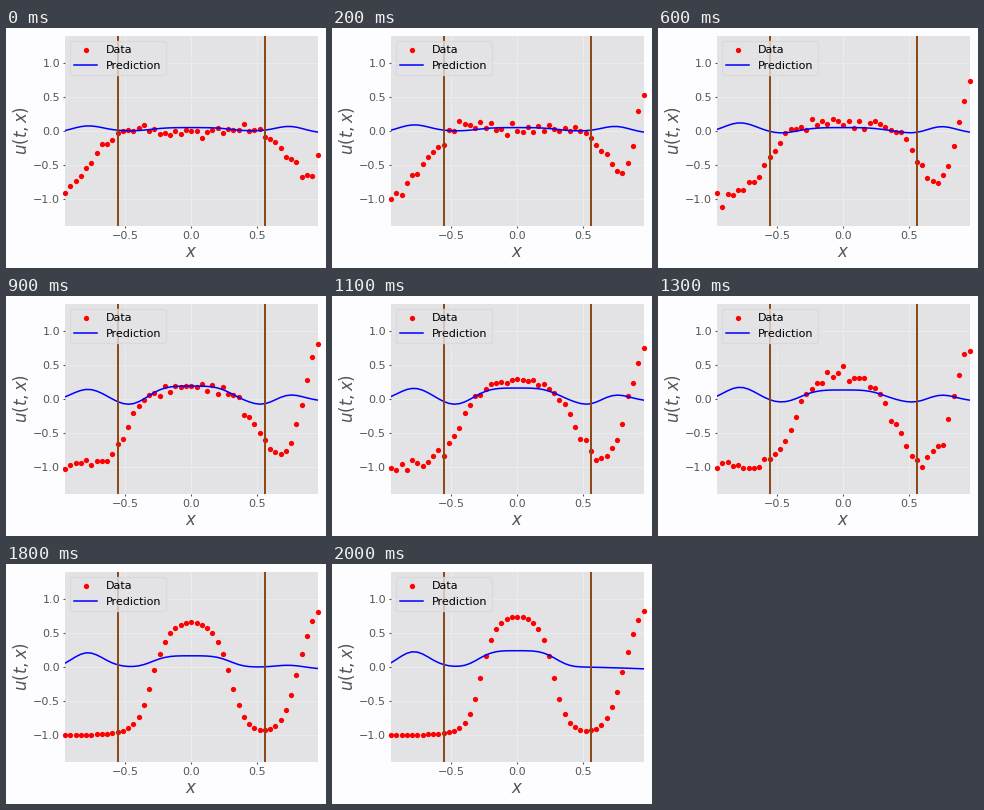
A matplotlib script for the animation above (2100 ms loop, 320 px wide and 240 px high).

```python
import matplotlib.pyplot as plt
import numpy as np
from matplotlib.animation import FuncAnimation

W, H, DPI = 320, 240, 100
FRAMES, INTERVAL = 21, 100
NOISY_UNTIL = 14
NOISE = 0.045
PAPER, PANEL, GRID, INK = "#fdfcff", "#e3e2e4", "#ebeaed", "#555555"

x = np.linspace(-0.96, 0.96, 49)


def bump(center, width, power=2):
    return np.exp(-np.abs((x - center) / width) ** power)


def field(p):
    """Saturating growth of x^2 cos(pi x), with a front entering from the right."""
    start = x**2 * np.cos(np.pi * x)
    grown = (start * np.exp(5.2 * p - 1.9 * p**2)
             + p**2.2 * (2.1 * np.cos(6.5 * x) - 1))
    core = grown / np.sqrt(1 - start**2 + grown**2)
    q = p**0.35
    front = 1 / (1 + np.exp((0.98 - 0.17 * q - x) / (0.025 + 0.04 * q)))
    return core + (1 - core) * front


def measured(i):
    u = field(i / (FRAMES - 1))
    if i < NOISY_UNTIL:
        u = u + np.random.default_rng(i + 7).normal(0, NOISE, x.size)
    return u


def predicted(i):
    p = i / (FRAMES - 1)
    middle = np.interp(p, [0, 0.3, 0.45, 0.8, 1], [0.04, 0.04, 0.18, 0.08, 0.23])
    left = 0.09 + 0.15 * p
    right = 0.08 * (1 - p**6)
    dip = 0.09 * np.exp(-((p - 0.5) / 0.2) ** 2)
    return (middle * bump(0, 0.32, 4)
            + left * bump(-0.79, 0.17) + right * bump(0.75, 0.15)
            - dip * (bump(-0.48, 0.14) + bump(0.54, 0.14))
            + 0.01 - 0.04 * x**2)


plt.rcParams.update({"font.family": "DejaVu Sans", "font.size": 8})
fig = plt.figure(figsize=(W / DPI, H / DPI), dpi=DPI, facecolor=PAPER)
ax = fig.add_axes([59 / W, 42 / H, 252.5 / W, 190 / H], facecolor=PANEL)
ax.set(xlim=(-0.96, 0.96), ylim=(-1.4, 1.4),
       xticks=[-0.5, 0, 0.5], yticks=np.arange(-1, 1.1, 0.5))
ax.spines[:].set_visible(False)
ax.set_axisbelow(True)
ax.grid(color=GRID, lw=0.8)
ax.tick_params(length=1.5, width=0.8, pad=2, color=INK, labelcolor=INK)
label = dict(ha="center", va="center", fontsize=12, color=INK)
fig.text(185.5 / W, 1 - 224 / H, "$x$", **label)
fig.text(15 / W, 1 - 103 / H, "$u(t, x)$", rotation=90, **label)

dots, = ax.plot(x, measured(0), "o", color="red", ms=3.8, mew=0,
                clip_on=False, label="Data")
line, = ax.plot(x, predicted(0), color="blue", lw=1.1, label="Prediction")
for edge in (-0.56, 0.56):
    ax.axvline(edge, color="saddlebrown", lw=1.4)
ax.legend(loc="upper left", facecolor=PANEL, edgecolor="#d8d7da",
          borderaxespad=0.45)


def update(i):
    dots.set_ydata(measured(i))
    line.set_ydata(predicted(i))
    return dots, line


anim = FuncAnimation(fig, update, frames=FRAMES, interval=INTERVAL,
                     repeat=True, repeat_delay=0)
plt.show()
```
